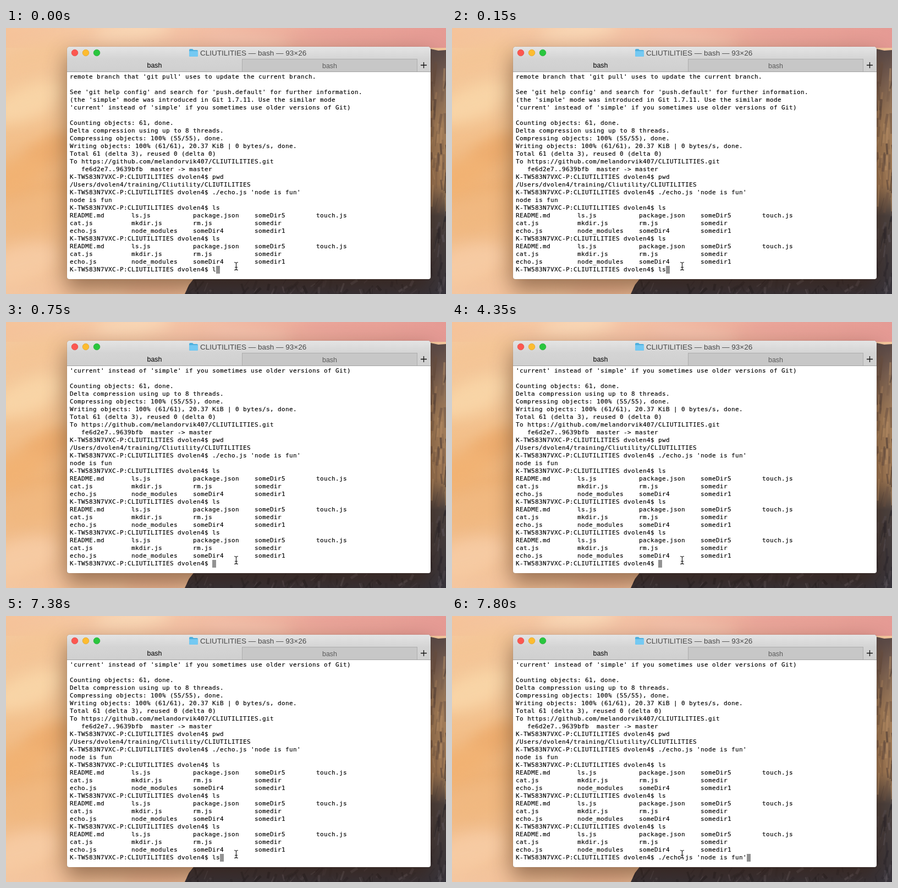
Recreate the animation shown at these times as an HTML page with a canvas. Size 800 by 483 pixels, loop 8 s.

```html
<!DOCTYPE html>
<html lang="en">
<head>
<meta charset="utf-8">
<title>Terminal</title>
<style>
  html, body { margin: 0; width: 100%; height: 100%; overflow: hidden; background: #f0c9a0; }
  #stage { position: relative; width: 800px; height: 483px; overflow: hidden; }
  #stage > * { position: absolute; }
  #sky { left: 0; top: 0; }
  #window {
    left: 111px; top: 34px; width: 661px; height: 422px;
    border-radius: 5px 5px 4px 4px; background: #fff;
    box-shadow: 0 0 1px rgba(0,0,0,.5), 0 17px 38px 3px rgba(50,20,0,.45);
  }
  #bar, .tab, #title { position: absolute; font-family: "Liberation Sans", Arial, sans-serif; }
  #bar {
    left: 0; top: 0; width: 661px; height: 46px; box-sizing: border-box;
    border-radius: 5px 5px 0 0; border-bottom: 1px solid #a3a3a3;
    background: linear-gradient(#e4e4e4, #d4d4d4 22px, #d0d0d0);
  }
  #title { left: 242px; top: 3px; line-height: 17px; font-size: 13.5px; color: #484848; white-space: pre; }
  .tab { top: 22px; height: 23px; line-height: 24px; text-align: center; font-size: 12.4px; box-sizing: border-box; }
  .on { left: 0; width: 318px; color: #000; }
  .off { left: 318px; width: 319px; color: #5c5c5c; background: #c7c7c7; border: solid #adadad; border-width: 1px 1px 0; }
  #icons { left: 0; top: 0; }
  #screen {
    left: 116px; top: 82px; margin: 0; color: #000; white-space: pre;
    font: 11px/14px "DejaVu Sans Mono", monospace;
    letter-spacing: calc(7px - 1ch);
    -webkit-text-stroke: .15px #000;
  }
  #caret { top: 432px; width: 7px; height: 14px; background: #929292; }
</style>
</head>
<body>
<div id="stage">
  <canvas id="sky" width="800" height="483"></canvas>
  <div id="window">
    <div id="bar">
      <div id="title">CLIUTILITIES — bash — 93×26</div>
      <div class="tab on">bash</div>
      <div class="tab off">bash</div>
    </div>
  </div>
  <pre id="screen"></pre>
  <div id="caret"></div>
  <svg id="icons" width="800" height="483">
    <defs>
      <path id="beam" d="M415.5 425.5q3 0 3 2v10q0 2-3 2M421.5 425.5q-3 0-3 2v10q0 2 3 2M416.5 434.5h4"/>
    </defs>
    <g stroke-width=".7">
      <circle cx="125" cy="45" r="5.8" fill="#fc5750" stroke="#de4540"/>
      <circle cx="145" cy="45" r="5.8" fill="#fdbc30" stroke="#dd9f28"/>
      <circle cx="165" cy="45" r="5.8" fill="#29c63e" stroke="#20aa30"/>
    </g>
    <path d="M333 40q0-2 2-2h4l2 2h6q2 0 2 2v8q0 2-2 2h-12q-2 0-2-2z" fill="#4fb0de"/>
    <path d="M333 42h16v8q0 2-2 2h-12q-2 0-2-2z" fill="#74c9f2"/>
    <path d="M754 67.5h11M759.5 62v11" stroke="#111" stroke-width="1.3"/>
    <g fill="none" stroke-linecap="round">
      <use href="#beam" stroke="#fff" stroke-width="2.4"/>
      <use href="#beam" stroke="#111" stroke-width="1.1"/>
    </g>
  </svg>
</div>
<script>
const LOOP = 8000, CELL = 7, LEFT = 116, ROWS = 26;
const PROMPT = "K-TW583N7VXC-P:CLIUTILITIES dvolen4$ ";
const ECHO = "./echo.js 'node is fun'";

const files = [
  ["README.md", "ls.js", "package.json", "someDir5", "touch.js"],
  ["cat.js", "mkdir.js", "rm.js", "somedir"],
  ["echo.js", "node_modules", "someDir4", "somedir1"]
].map(row => row.map(name => name.padEnd(16)).join(""));
const listing = [PROMPT + "ls", ...files];

const log = [
  "remote branch that 'git pull' uses to update the current branch.",
  "",
  "See 'git help config' and search for 'push.default' for further information.",
  "(the 'simple' mode was introduced in Git 1.7.11. Use the similar mode",
  "'current' instead of 'simple' if you sometimes use older versions of Git)",
  "",
  "Counting objects: 61, done.",
  "Delta compression using up to 8 threads.",
  "Compressing objects: 100% (55/55), done.",
  "Writing objects: 100% (61/61), 20.37 KiB | 0 bytes/s, done.",
  "Total 61 (delta 3), reused 0 (delta 0)",
  "To https://github.com/melandorvik407/CLIUTILITIES.git",
  "   fe6d2e7..9639bfb  master -> master",
  PROMPT + "pwd",
  "/Users/dvolen4/training/Cliutility/CLIUTILITIES",
  PROMPT + ECHO,
  "node is fun",
  ...listing, ...listing, ...listing
];

// start time, lines scrolled off, text at the prompt
const steps = [
  [0, 0, "l"],
  [150, 0, "ls"],
  [750, 4, ""],
  [6750, 4, "ls"],
  [7800, 4, ECHO]
];

const screenEl = document.getElementById("screen");
const caret = document.getElementById("caret");
let shown;

function show(step) {
  if (step === shown) return;
  shown = step;
  const [, skip, typed] = step;
  const line = PROMPT + typed;
  screenEl.textContent = [...log.slice(skip, skip + ROWS - 1), line].join("\n");
  caret.style.left = LEFT + CELL * line.length + "px";
}

function paintSky() {
  const g = document.getElementById("sky").getContext("2d");
  let seed = 7;
  const rand = () => (seed = seed * 16807 % 2147483647) / 2147483647;

  const fade = (x0, y0, x1, y1, stops) => {
    const gradient = g.createLinearGradient(x0, y0, x1, y1);
    stops.forEach(([at, color]) => gradient.addColorStop(at, color));
    return gradient;
  };
  g.fillStyle = fade(0, 0, 0, 483, [[0, "#f5c9a0"], [.3, "#f5c898"], [.6, "#f0b478"], [.8, "#f2be8c"], [1, "#f4c6a0"]]);
  g.fillRect(0, 0, 800, 483);
  g.fillStyle = fade(0, 0, 800, 0, [[0, "#f5c39a"], [.3, "#f6caa8"], [.55, "#f0b5a0"], [.8, "#e9a498"], [1, "#e59a94"]]);
  g.fillRect(0, 0, 800, 36);

  // soft clouds: x, y, width, height, tilt, colour
  const clouds = [
    [40, 60, 90, 26, -.3, "#f4c596"],
    [230, 6, 70, 12, -.1, "#f9d9b8"],
    [440, 24, 80, 10, .1, "#f3c4ae"],
    [620, 6, 90, 10, 0, "#e8a097"],
    [40, 135, 70, 28, -.4, "#f8d4a6"],
    [75, 225, 50, 26, -.5, "#eeae70"],
    [15, 270, 55, 26, -.5, "#f1b273"],
    [60, 335, 75, 24, -.4, "#f0b880"],
    [25, 430, 75, 32, -.3, "#f6caa2"],
    [130, 478, 90, 20, -.2, "#f3c29a"],
    [270, 478, 60, 18, 0, "#efb894"]
  ];
  g.filter = "blur(12px)";
  for (const [x, y, w, h, tilt, color] of clouds) {
    g.fillStyle = color;
    g.beginPath();
    g.ellipse(x, y, w, h, tilt, 0, 7);
    g.fill();
  }
  g.filter = "none";

  // cliff behind the window
  g.beginPath();
  [[325, 483], [333, 466], [347, 448], [700, 70], [772, 38], [786, 41], [800, 40], [800, 483]]
    .forEach(([x, y]) => g.lineTo(x, y));
  g.closePath();
  g.clip();
  g.fillStyle = fade(0, 40, 0, 483, [[0, "#5a4a48"], [.12, "#7c6456"], [.3, "#a9845f"], [.55, "#a27c58"], [.68, "#4c4340"], [1, "#38353c"]]);
  g.fillRect(300, 30, 500, 453);

  const streak = (x, y, dx, dy, tones) => {
    g.globalAlpha = .2 + rand() * .4;
    g.strokeStyle = tones[Math.floor(rand() * tones.length)];
    g.lineWidth = 1 + rand() * 4;
    g.beginPath();
    g.moveTo(x, y);
    g.lineTo(x + dx, y + dy);
    g.stroke();
  };
  const warm = ["#4a3c38", "#c39a70", "#6e5648"];
  const cold = ["#232228", "#5f5960", "#2c2a30"];
  for (let i = 0; i < 60; i++) streak(768 + rand() * 36, 40 + rand() * 270, rand() * 10 - 7, 12 + rand() * 32, warm);
  for (let i = 0; i < 30; i++) streak(768 + rand() * 36, 330 + rand() * 140, rand() * 12 - 8, 10 + rand() * 22, cold);
  for (let i = 0; i < 90; i++) streak(325 + rand() * 475, 455 + rand() * 26, rand() * 24 - 16, 5 + rand() * 14, cold);
}

paintSky();
show(steps[0]);
const begin = performance.now();
requestAnimationFrame(function tick(now) {
  const t = Math.max(0, now - begin) % LOOP;
  show(steps.findLast(([start]) => t >= start));
  requestAnimationFrame(tick);
});
</script>
</body>
</html>
```
